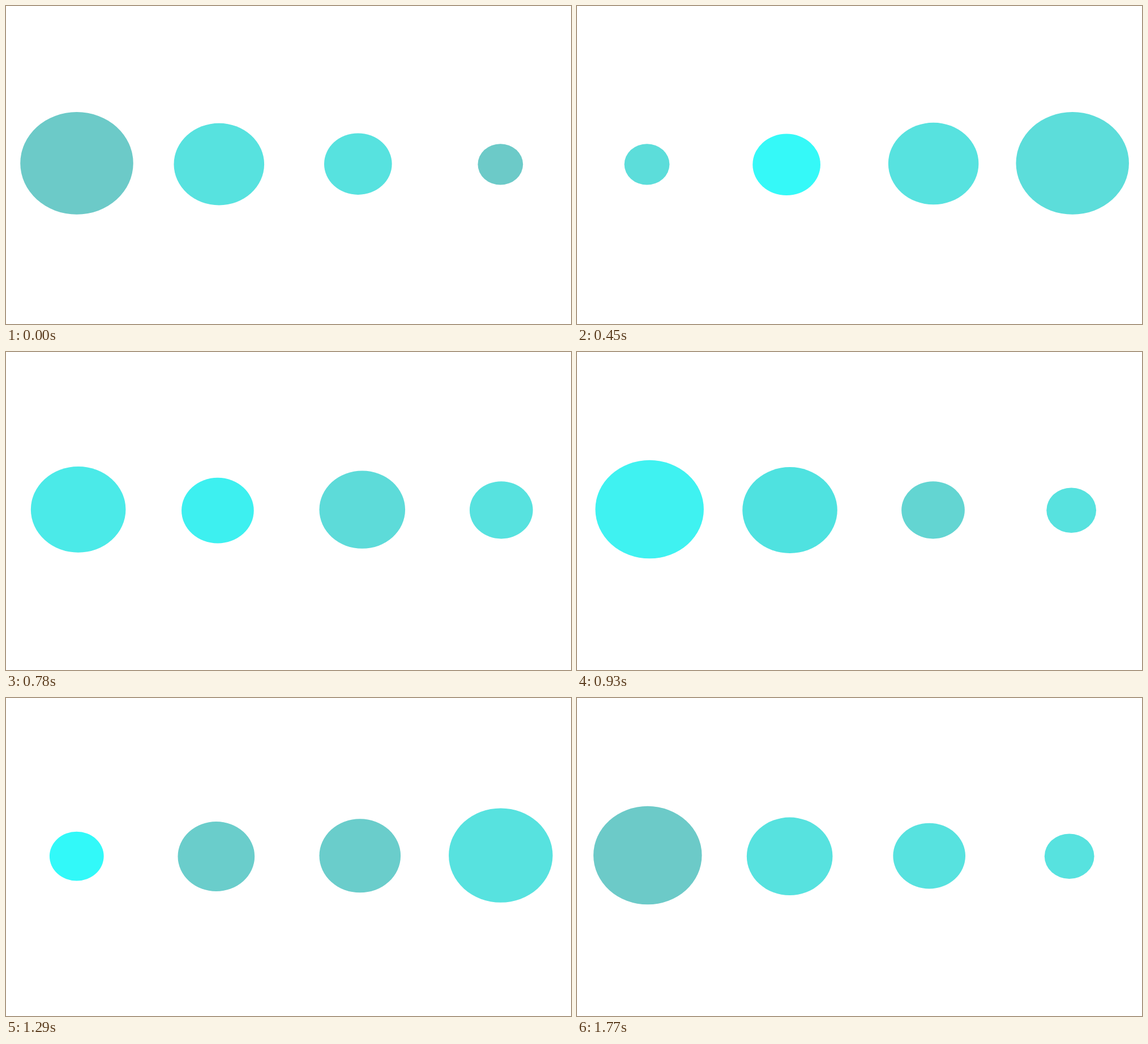
Write an HTML page that moves like this. It is 998 px wide and 561 px high and loops after 1.8 s.

```html
<!DOCTYPE html>
<html lang="en">
<head>
<meta charset="utf-8">
<title>Pulsing dots</title>
<style>
  html, body { margin: 0; width: 100%; height: 100%; overflow: hidden; background: #fff; }
  svg { display: block; width: 998px; height: 561px; }
</style>
</head>
<body>
<svg id="stage" viewBox="0 0 998 561"></svg>
<script>
const STEP_MS = 30, STEPS = 60;
const TEAL = [108, 202, 200], AQUA = [87, 226, 223], CYAN = [43, 255, 255];

// phase: start of the pulse; turn: step the pulse is mirrored around
// colors and sway (centre x) are keys spread evenly over the loop
const dots = [
  { phase: 0, turn: 0, y: 280.6, colors: [TEAL, AQUA, CYAN, TEAL],
    sway: [125, 120.8, 126.2, 128.6, 124.2, 126.2, 124.6] },
  { phase: 5, turn: 0, y: 281.7, colors: [AQUA, CYAN, TEAL, AQUA],
    sway: [376.3, 370.2, 370, 376.5, 371.7, 370.5, 376.2] },
  { phase: 5, turn: 15, y: 280.6, colors: [AQUA, AQUA, TEAL, AQUA],
    sway: [621.8, 630.3, 628.9, 629.5, 624.4, 627.3, 621.6] },
  { phase: 3, turn: 0, y: 280.6, colors: [TEAL, AQUA, AQUA, AQUA],
    sway: [873.3, 873.2, 877.2, 873.2, 873, 875.8, 869] }
];

const mix = (a, b, u) => a + (b - a) * u;
const clamp = u => Math.min(1, Math.max(0, u));

// Pair of neighbouring keys and the progress between them
function span(keys, step) {
  const pos = step / STEPS * (keys.length - 1);
  const i = Math.floor(pos);
  return [keys[i], keys[i + 1], pos - i];
}

// Triangle wave between 2 and 5 units, 30 steps long
function radiusAt({ phase, turn }, step) {
  const wave = (Math.abs(step - turn) / 5 + phase) % 6;
  return 19.95 * (2 + Math.abs(wave - 3));
}

// Each blend rests for one step at both ends
function colorAt({ colors }, step) {
  const [from, to, u] = span(colors, step);
  const eased = clamp((u * 20 - 1) / 18);
  return `rgb(${from.map((v, k) => Math.round(mix(v, to[k], eased)))})`;
}

const stage = document.getElementById("stage");
for (const dot of dots) {
  dot.el = document.createElementNS(stage.namespaceURI, "ellipse");
  stage.append(dot.el);
}

function draw() {
  const step = Math.floor(performance.now() / STEP_MS) % STEPS;
  for (const dot of dots) {
    const rx = radiusAt(dot, step);
    const shape = {
      cx: mix(...span(dot.sway, step)),
      cy: dot.y - rx * 0.032,
      rx,
      ry: rx * 0.906,
      fill: colorAt(dot, step)
    };
    for (const name in shape) dot.el.setAttribute(name, shape[name]);
  }
  requestAnimationFrame(draw);
}
draw();
</script>
</body>
</html>
```
